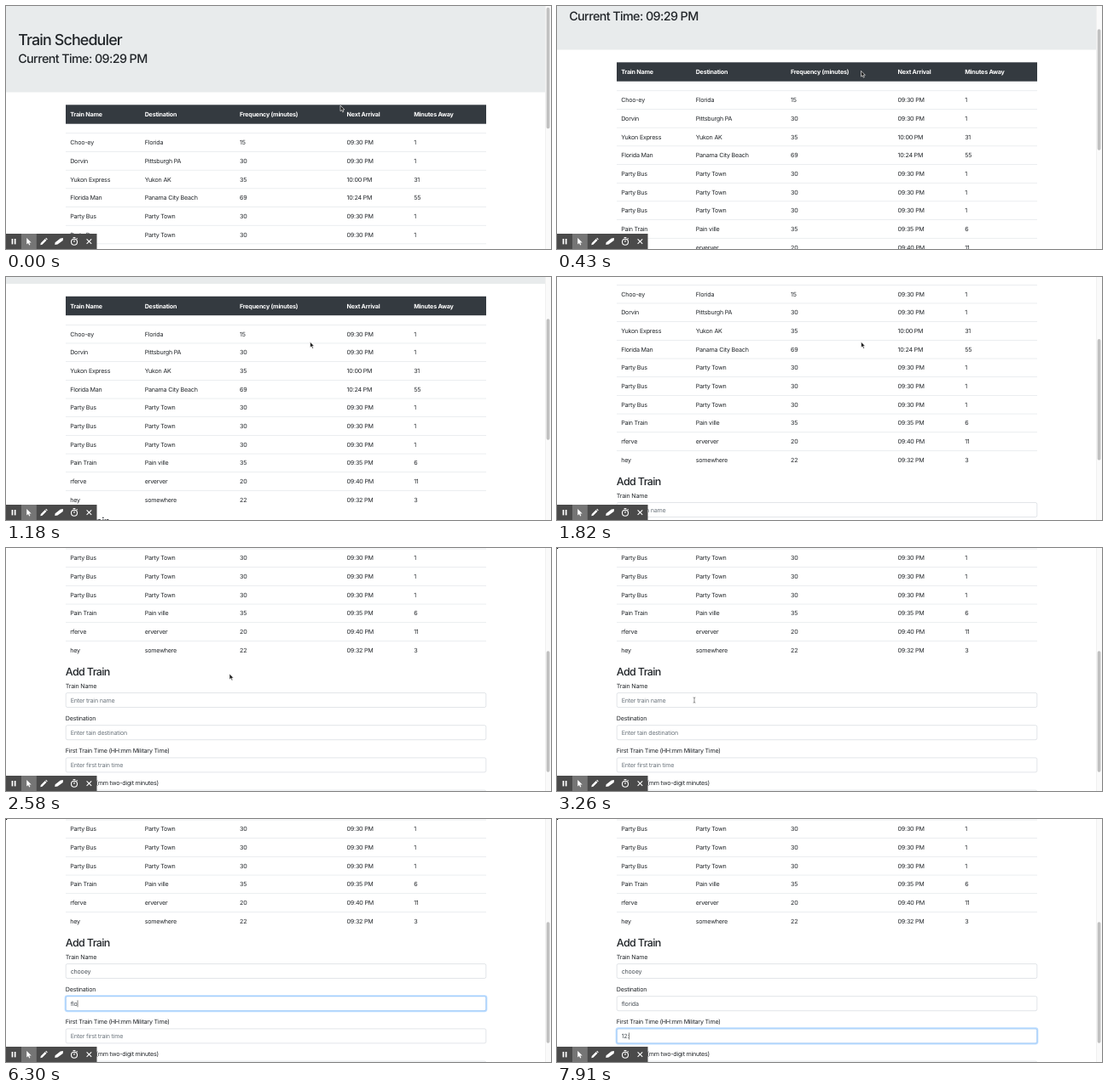
Recreate the animation shown at these times as an HTML page. Size 639 by 286 pixels, loop 8 s.

```html
<!DOCTYPE html>
<html lang="en">
<head>
<meta charset="utf-8">
<title>Train Scheduler</title>
<style>
  html, body { margin: 0; width: 100%; height: 100%; overflow: hidden; background: #fff; }
  svg { display: block; width: 100vw; height: 100vh; }
  text { font-family: Inter, "Liberation Sans", sans-serif; font-size: 7.14px; letter-spacing: -.03em;
         fill: #212529; text-rendering: geometricPrecision; white-space: pre; }
  .h1 { font-size: 17.85px; font-weight: 500; letter-spacing: -.047em; }
  .h2 { font-size: 14.3px; font-weight: 500; letter-spacing: -.041em; }
  .h3 { font-size: 12.5px; font-weight: 500; letter-spacing: -.05em; }
  .th { font-weight: 700; fill: #fff; }
  .value { fill: #495057; }
  .hint { fill: #6c757d; }
</style>
</head>
<body>
<svg id="stage" viewBox="0 0 639 286"></svg>
<script>
const LOOP = 8000;
const COLS = [75.2, 162.7, 274, 399.6, 478.2];
const HEAD = ["Train Name", "Destination", "Frequency (minutes)", "Next Arrival", "Minutes Away"];
const ROWS = [
  ["Choo-ey", "Florida", "15", "09:30 PM", "1"],
  ["Dorvin", "Pittsburgh PA", "30", "09:30 PM", "1"],
  ["Yukon Express", "Yukon AK", "35", "10:00 PM", "31"],
  ["Florida Man", "Panama City Beach", "69", "10:24 PM", "55"],
  ["Party Bus", "Party Town", "30", "09:30 PM", "1"],
  ["Party Bus", "Party Town", "30", "09:30 PM", "1"],
  ["Party Bus", "Party Town", "30", "09:30 PM", "1"],
  ["Pain Train", "Pain ville", "35", "09:35 PM", "6"],
  ["rferve", "erverver", "20", "09:40 PM", "11"],
  ["hey", "somewhere", "22", "09:32 PM", "3"]
];
const FIELDS = [
  ["Train Name", "Enter train name"],
  ["Destination", "Enter tain destination"],
  ["First Train Time (HH:mm Military Time)", "Enter first train time"],
  ["Frequency (mm two-digit minutes)", ""]
];

// step tables: [start ms, value]
const SCROLL = [[0, 0], [300, 24], [430, 50], [1030, 72], [1180, 93.5], [1490, 96], [1820, 140.5], [2020, 235.5]];
const POINTER = [
  [0, [392, 117]], [100, [372, 96]], [160, [356.5, 76.3]], [2320, [350, 82]], [2450, [316, 112]],
  [2580, [262, 148]], [2710, [206, 177]], [2840, [174, 182]], [2970, [163, 180]], [3100, [161, 179]], [5140, null]
];
const TYPED = [
  [[0, ""], [3980, "ch"], [4140, "cho"], [4430, "choo"], [4940, "chooe"], [5140, "chooey"]],
  [[0, ""], [5940, "f"], [6070, "fl"], [6300, "flo"], [6500, "flor"], [6710, "florid"], [6860, "florida"]],
  [[0, ""], [7660, "12"], [7910, "12:"]]
];
const CARET = [[0, -1], [3980, 0], [5330, 1], [6860, 2]];
const RINGS = [
  [[0, 0], [2970, .5], [3100, 1], [3260, 0]],
  [[0, 0], [5580, 1], [7170, .5], [7300, 0]],
  [[0, 0], [7170, .5], [7300, 1]]
];

const at = (steps, t) => {
  let v = steps[0][1];
  for (const [start, next] of steps) if (t >= start) v = next;
  return v;
};

const stage = document.getElementById("stage");
function add(parent, tag, attrs, content) {
  const el = document.createElementNS("http://www.w3.org/2000/svg", tag);
  for (const k in attrs) el.setAttribute(k, attrs[k]);
  if (content) el.textContent = content;
  return parent.appendChild(el);
}
const box = (p, x, y, width, height, fill, more) => add(p, "rect", { x, y, width, height, fill, ...more });
const label = (p, x, y, str, cls = "") => add(p, "text", { x, y, class: cls }, str);
const path = (p, d, more) => add(p, "path", { d, ...more });
const show = (el, on) => el.setAttribute("visibility", on ? "visible" : "hidden");

// page
const page = add(stage, "g", {});
box(page, 0, -1, 632, 102.5, "#e8ebec");
label(page, 14.2, 46, "Train Scheduler", "h1");
label(page, 14.2, 67, "Current Time: 09:29 PM", "h2");
box(page, 70, 116.3, 493, 22.4, "#343a40");
HEAD.forEach((s, i) => label(page, COLS[i], 130.2, s, "th"));
ROWS.forEach((row, r) => {
  const y = 160.6 + r * 21.68;
  box(page, 70, y - 11.1, 493, .6, "#dee2e6");
  row.forEach((s, i) => label(page, COLS[i], y + 2.6, s));
});
label(page, 69.8, 385.8, "Add Train", "h3");

const inputs = FIELDS.map(([name, hint], i) => {
  const y = 406 + i * 38.2;
  label(page, 69.8, y - 6, name);
  const frame = { rx: 1.8, "stroke-width": .6 };
  box(page, 70.2, y, 492.6, 17, "#fff", { ...frame, stroke: "#ced4da" });
  const ring = add(page, "g", { opacity: 0 });
  box(ring, 69.4, y - .8, 494.2, 18.6, "none", { rx: 2.4, stroke: "#bfdeff", "stroke-width": 1.5 });
  box(ring, 70.2, y, 492.6, 17, "none", { ...frame, stroke: "#80bdff" });
  return {
    ring,
    hint: label(page, 75.7, y + 11.1, hint, "hint"),
    text: label(page, 75.7, y + 11.1, "", "value"),
    caret: box(page, 75.6, y + 4.6, .6, 8, "#333")
  };
});

// scrollbar
box(stage, 632, 0, 7, 286, "#fafafa");
box(stage, 632, 0, .5, 286, "#e6e6e6");
const thumb = box(stage, 633.7, 2, 3.8, 142.5, "#c1c1c1", { rx: 1.9 });

// recorder toolbar
const bar = add(stage, "g", {});
box(bar, 0, 268, 106.5, 18, "#4a4a4a");
box(bar, 18, 268, 17.8, 18, "#757575");
const line = { fill: "none", stroke: "#fff", "stroke-width": 1.1 };
box(bar, 6.6, 274, 1.7, 6.4, "#fff");
box(bar, 9.8, 274, 1.7, 6.4, "#fff");
path(bar, "M24.2 273v7.6l1.8-1.6 1.2 2.6 1.2-.6-1.2-2.5h2.5z", { fill: "#fff" });
path(bar, "M40.3 281.2l.5-2.2 5-5 1.7 1.7-5 5zM46.3 273.5l.8-.8 1.7 1.7-.8.8z", { fill: "#fff" });
path(bar, "M57.6 278.2l6.2-4.7 3.2-.4-.3 2.8-6.2 4.7-3.2.4z", { fill: "#fff" });
add(bar, "circle", { cx: 80, cy: 277.7, r: 3.5, ...line });
path(bar, "M78.6 272.6h2.8M80 275.5v2.4M82.6 274.4l1-1", line);
path(bar, "M94.6 274.3l5.6 5.6M100.2 274.3l-5.6 5.6", line);

// pointers
const arrow = path(stage, "M0 0v6.8l1.6-1.4 1.1 2.5 1.2-.5-1.1-2.4h2.1z",
  { fill: "#222", stroke: "#fff", "stroke-width": .6 });
const beam = path(stage, "M-1.3-3.2Q0-3.2 0-2.3V2.3Q0 3.2-1.3 3.2M1.3-3.2Q0-3.2 0-2.3M0 2.3Q0 3.2 1.3 3.2",
  { fill: "none", stroke: "#444", "stroke-width": .6 });
const corner = box(stage, 0, 0, 1.2, 1, "#000");

function draw(t) {
  const scroll = at(SCROLL, t);
  page.setAttribute("transform", `translate(0 ${-scroll})`);
  thumb.setAttribute("y", 1.8 + scroll * .507);

  const focus = at(CARET, t);
  inputs.forEach((f, i) => {
    const str = TYPED[i] ? at(TYPED[i], t) : "";
    if (f.text.textContent !== str) f.text.textContent = str;
    show(f.hint, !str);
    f.ring.setAttribute("opacity", RINGS[i] ? at(RINGS[i], t) : 0);
    show(f.caret, focus === i);
    if (focus === i) f.caret.setAttribute("x", 75.7 + (str ? f.text.getComputedTextLength() : 0));
  });

  const pos = at(POINTER, t);
  const overInput = pos && scroll > 200 && pos[1] > 170;
  show(arrow, pos && !overInput);
  show(beam, overInput);
  if (pos) for (const el of [arrow, beam]) el.setAttribute("transform", `translate(${pos})`);
  show(corner, t >= 3260);
}

const start = performance.now();
function tick() {
  draw((performance.now() - start) % LOOP);
  requestAnimationFrame(tick);
}
tick();
</script>
</body>
</html>
```
